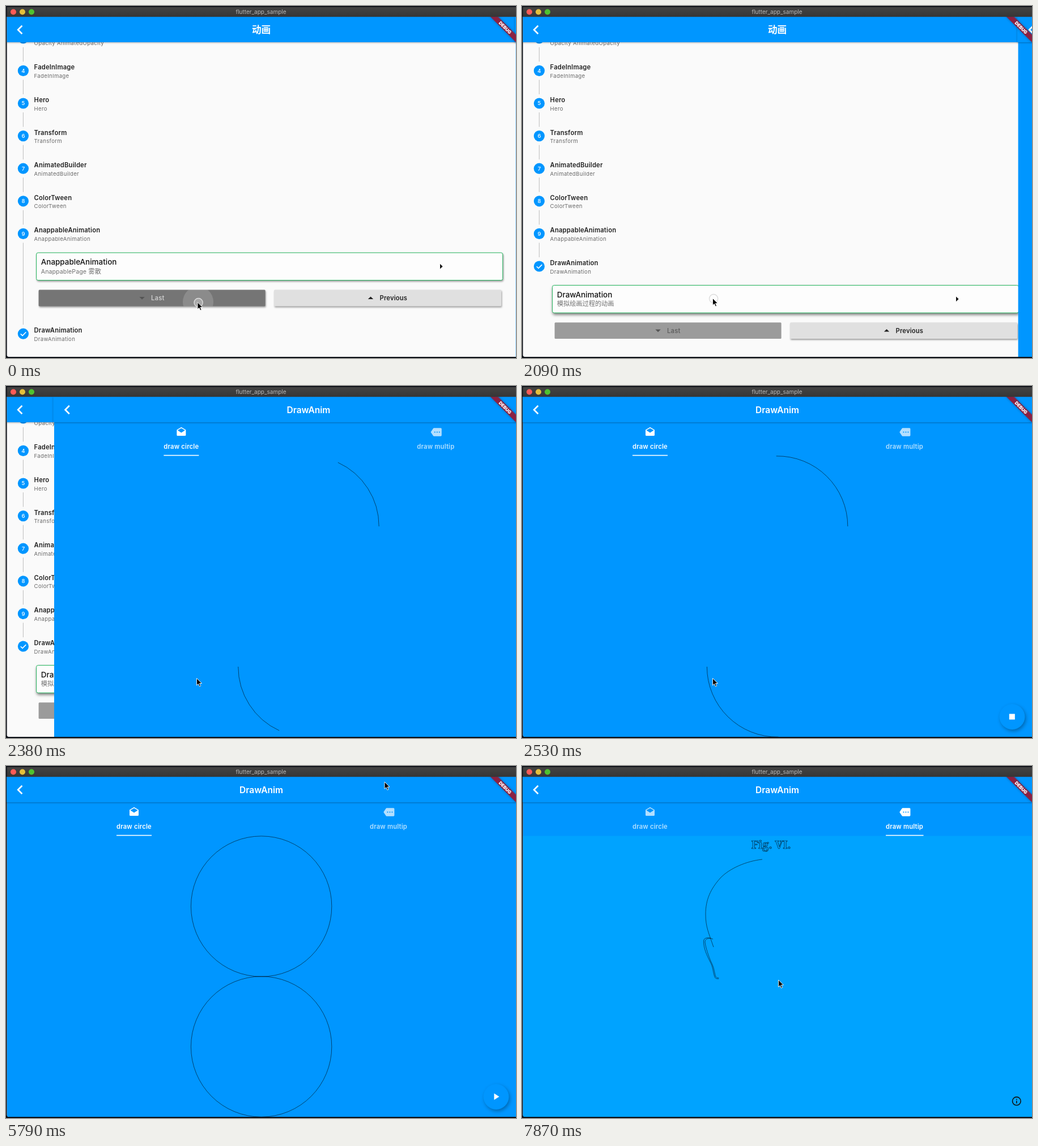
Write an HTML page that moves like this. It is 900 px wide and 622 px high and loops after 8 s.

```html
<!DOCTYPE html>
<html lang="zh">
<head>
<meta charset="utf-8">
<title>flutter_app_sample</title>
<style>
  html, body { margin: 0; width: 100%; height: 100%; overflow: hidden; background: #0a0e14; }
  svg { display: block; width: 100vw; height: 100vh; font-family: Inter, "Noto Sans CJK SC", "Noto Sans CJK", sans-serif; }
  .raised { filter: drop-shadow(1px 2px 1.5px rgba(0,0,0,.38)); }
  .high { filter: drop-shadow(1.5px 3px 2.5px rgba(0,0,0,.5)); }
  .bar { filter: drop-shadow(0 1.5px 1.5px rgba(0,0,0,.3)); }
  .fab { filter: drop-shadow(2px 3px 3px rgba(0,0,0,.3)); }
  .ink { fill: none; stroke: #000; stroke-width: .7; stroke-opacity: .8; }
</style>
</head>
<body>
<svg id="stage" viewBox="0 0 900 622" preserveAspectRatio="none"></svg>
<script>
const BLUE = '#0096ff', LOOP = 8000, PAGE_W = 898, ROW = 57.6, OPEN = 119.2;
const STEPS = ['FadeInImage', 'Hero', 'Transform', 'AnimatedBuilder', 'ColorTween', 'AnappableAnimation'];

// Screen updates come in bursts: [first, last, count]
const BURSTS = [[150, 450, 3], [750, 900, 2], [1940, 2970, 8], [3120, 4160, 8],
  [4460, 4600, 2], [5200, 6240, 8], [6390, 6830, 4], [7130, 7870, 6]];
const TICKS = [0, ...BURSTS.flatMap(([a, b, n]) =>
  Array.from({ length: n }, (_, i) => Math.floor((a + (b - a) * i / (n - 1)) / 10) * 10))];

const CURSOR = [[0, 338, 523.5], [150, 338, 523.5], [300, 325, 528], [450, 297, 536], [750, 318, 526],
  [900, 336.5, 516.5], [3420, 336.5, 516.5], [3860, 399.5, 438], [4160, 615, 203], [4460, 650, 150],
  [4600, 676, 98], [5200, 676, 90], [5640, 672, 20], [5790, 668, 28], [6240, 624, 353],
  [6540, 500, 368], [6830, 481, 370], [7280, 481, 372], [7870, 452.5, 378]];
const PRESSES = [[0, 300], [1940, 2200], [6240, 6600]];
const SWIPE = [[6240, 0], [6390, .07], [6540, .35], [6690, .9], [6830, 1]];
const FOLD = [[0, 0], [150, .2], [300, .8], [450, 1]];

const text = (x, y, s, size, o = '') => `<text x="${x}" y="${y}" font-size="${size}" ${o}>${s}</text>`;
const rect = (x, y, w, h, fill, o = '') => `<rect x="${x}" y="${y}" width="${w}" height="${h}" fill="${fill}" ${o}/>`;
const dot = (x, y, r, fill, o = '') => `<circle cx="${x}" cy="${y}" r="${r}" fill="${fill}" ${o}/>`;
const rail = (y1, y2, id = '') => `<line ${id} x1="30.4" x2="30.4" y1="${y1}" y2="${y2}" stroke="#bdbdbd"/>`;
const label = (x, y, s, o = '') => text(x, y, s, 11.2, `font-weight="600" letter-spacing=".2" ${o}`);
const back = '<path d="M28.4 34.8L21.2 42l7.2 7.2" fill="none" stroke="#fff" stroke-width="2.7"/>';
const appBar = title => `<g class="bar">${rect(0, 19, 900, 45, BLUE)}</g>${back}${title}`;

const heading = (y, s) => label(49.6, y - 2, s, 'fill="#212121"') +
  text(49.6, y + 12.6, s, 9.6, 'letter-spacing=".32" fill="#6a6a6a"');
const step = (y, n, s) => dot(30.4, y, 9.6, BLUE) +
  text(30.4, y + 3.4, n, 9.6, 'text-anchor="middle" font-weight="500" fill="#fff"') + heading(y, s);

// Card and buttons, relative to the centre of the step's circle
function content({ title, sub, card, last, ink, arrow, lift = '', extra = '' }) {
  return `<g class="${card}">${rect(53.6, 33.6, 823, 48.6, '#fdfdfd', 'rx="3" stroke="#22b35c"')}</g>
    ${text(61.8, 54.6, title, 13.4, 'font-weight="500" letter-spacing=".03" fill="#111"')}${sub}
    <path d="M766 53.4l4.6 4.4-4.6 4.4z" fill="#111"/>
    <g class="${lift}">${rect(57.6, 99.2, 400, 28.8, last, 'rx="1.5"')}</g>${extra}
    <path d="M235.4 111.6h9.4l-4.7 4.7z" fill="${arrow}"/>
    ${label(256, 117.7, 'Last', `fill="${ink}"`)}
    <g class="raised">${rect(473, 99.2, 401, 28.8, '#e0e0e0', 'rx="1.5"')}</g>
    <path d="M638.8 115.6h9.4l-4.7-4.6z" fill="#222"/>
    ${label(659.5, 117.7, 'Previous', 'fill="#222"')}`;
}

const listPage = () => {
  const subInk = 'fill="#707070"';
  const oldContent = content({
    title: 'AnappableAnimation', card: 'raised', lift: 'raised',
    sub: text(61.8, 70.2, 'AnappablePage', 10.6, subInk + ' letter-spacing=".08"') + text(145.5, 70.2, '雾散', 11.2, subInk),
    last: '#757575', ink: '#cbcbcb', arrow: '#555',
    extra: '<g clip-path="url(#btnClip)">' + dot(339, 120.5, 27, '#fff', 'fill-opacity=".16"') + '</g>',
  });
  const newContent = content({
    title: 'DrawAnimation', card: 'high',
    sub: text(61.8, 70.2, '模拟绘画过程的动画', 11.2, subInk),
    last: '#9b9b9b', ink: '#626262', arrow: '#555',
  });
  return rect(0, 19, 900, 603, '#fafafa') +
    dot(30.4, 56.8, 9.6, BLUE) + heading(56.8, 'Opacity AnimatedOpacity') +
    STEPS.map((s, i) => {
      const y = 114.4 + i * ROW;
      return rail(y - 41.6, y - 16) + step(y, i + 4, s);
    }).join('') + rail(418.4, 444, 'id="longRail"') +
    `<g transform="translate(0 402.4)"><g id="old" clip-path="url(#oldClip)">${oldContent}</g></g>
    <g id="drawStep">${dot(30.4, 0, 9.6, BLUE)}
      <path d="M25.8 .2l3.3 3.2 6.2-6.3" fill="none" stroke="#fff" stroke-width="1.6"/>
      ${heading(0, 'DrawAnimation')}
      <g id="fresh" clip-path="url(#freshClip)">${newContent}</g>
    </g>` +
    appBar(text(450.5, 47.8, '动画', 16.6, 'text-anchor="middle" font-weight="700" fill="#fff"'));
};

const MAIL = 'M22 8c0-.72-.37-1.35-.94-1.7L12 1 2.95 6.3C2.38 6.65 2 7.28 2 8v10c0 1.1.9 2 2 2h16c1.1 0 2-.9 2-2zM12 13L3.74 7.84 12 3l8.26 4.84z';
const TAG = 'M22 3H7c-.69 0-1.23.35-1.59.88L0 12l5.41 8.11c.36.53.9.89 1.59.89h15c1.1 0 2-.9 2-2V5c0-1.1-.9-2-2-2z';
const HEAD = 'M424 165C396 168 366 181 350 198C333 217 324 236 324 262C324 285 330 296 338 320';
const NOSE = ['M337 306C329 302 321 303 320.6 309C320 322 327 336 332 346C337 355 337 363 339.5 371C341 376.5 344 376 347.4 376',
  'M333 304.6C326 304 322.6 307 323 312C324.5 322 329 335 333.6 346C339 356 339.4 364 341.4 371C342.4 374.4 345 374.4 347.4 374.4'];
const stroke = (d, cls) => `<path class="ink ${cls}" pathLength="1" d="${d}"/>`;

const drawPage = () => rect(1.6, 19, PAGE_W + 1, 603, BLUE) +
  `<g id="tabs">
    <g>
      <path id="arcs" class="ink"/>
      <g class="fab">${dot(865, 584.5, 22.4, BLUE)}</g>
      ${rect(859.8, 579.4, 10, 10, '#fff', 'id="stop"')}
      <path id="play" d="M861.4 578.6v11.4l9-5.7z" fill="#fff"/>
    </g>
    <g transform="translate(${PAGE_W} 0)">
      ${rect(1.6, 123.6, PAGE_W + 1, 499, '#00a3ff')}
      ${text(404.8, 146, 'Fig. VI.', 20, 'id="fig" class="ink" font-weight="700" font-family="Noto Serif, serif"')}
      ${stroke(HEAD, 'head')}${NOSE.map(d => stroke(d, 'nose')).join('')}
      ${dot(872.8, 592.2, 7.3, 'none', 'stroke="#111" stroke-width="1.6"')}
      ${rect(872, 591.4, 1.6, 4.8, '#111')}${rect(872, 588.2, 1.6, 1.6, '#111')}
    </g>
  </g>
  <g id="tabA" fill="#fff"><path transform="translate(216.4 72) scale(.8)" d="${MAIL}"/>
    ${label(195, 111, 'draw circle')}</g>
  <g id="tabB" fill="#fff"><path transform="translate(666.2 71.9) scale(.8)" d="${TAG}"/>
    ${[673.4, 677.4, 681.4].map(x => dot(x, 81.5, 1.1, BLUE)).join('')}
    ${label(642, 111, 'draw multip')}</g>
  ${rect(195, 121.8, 62, 1.6, '#fff', 'id="mark"')}` +
  appBar(text(450.5, 47.6, 'DrawAnim', 15.5, 'text-anchor="middle" font-weight="600" fill="#fff"'));

const clip = (id, shape) => `<clipPath id="${id}">${shape}</clipPath>`;
document.getElementById('stage').innerHTML = `
  <defs>
    <linearGradient id="chrome" x2="0" y2="1"><stop stop-color="#444"/><stop offset="1" stop-color="#363636"/></linearGradient>
    ${clip('win', '<path d="M1.6 1.6H900V620H5q-3.4 0-3.4-3.4z"/>')}
    ${clip('oldClip', rect(0, 16, 900, 146, '#000', 'id="oldBox"'))}
    ${clip('freshClip', rect(0, 16, 900, 146, '#000', 'id="freshBox"'))}
    ${clip('btnClip', rect(57.6, 99.2, 400, 28.8, '#000'))}
  </defs>
  ${rect(0, 0, 900, 622, '#0a0e14')}
  <g clip-path="url(#win)">
    ${listPage()}
    <g id="drawPage">${drawPage()}</g>
    <g transform="translate(900 19) rotate(45)">
      ${rect(-33, 22.4, 66, 9.6, '#8b2142', 'style="filter:drop-shadow(0 0 2px rgba(0,0,0,.35))"')}
      ${text(0, 30.1, 'DEBUG', 8, 'text-anchor="middle" font-weight="900" fill="#fff"')}
    </g>
    ${rect(0, 1.6, 900, 17.6, 'url(#chrome)')}
    ${dot(13, 10.5, 5, '#fc5b57')}${dot(29, 10.5, 5, '#e5bf3c')}${dot(45, 10.5, 5, '#4fc22f')}
    ${text(450, 14, 'flutter_app_sample', 10, 'text-anchor="middle" fill="#b9b9b9"')}
  </g>
  <g id="cursor">
    ${dot(1.6, .6, 7.6, '#fff', 'id="press" fill-opacity=".25" stroke="#ddd" stroke-width="1.4"')}
    <path d="M0 0v12.4l2.9-2.6 2 4.6 2.1-.9-2-4.5h4z" fill="#000" stroke="#fff" stroke-width=".9"/>
  </g>`;

const $ = id => document.getElementById(id);
const set = (id, attrs) => { for (const k in attrs) $(id).setAttribute(k, attrs[k]); };
const move = (id, x, y) => set(id, { transform: `translate(${x} ${y})` });
const ramp = (t, a, b) => Math.min(1, Math.max(0, (t - a) / (b - a)));
const smooth = u => u * u * (3 - 2 * u);

function track(keys, t) {
  let i = 0;
  while (i < keys.length - 2 && t >= keys[i + 1][0]) i++;
  const [a, b] = [keys[i], keys[i + 1]], u = ramp(t, a[0], b[0]);
  return a.slice(1).map((v, k) => v + (b[k + 1] - v) * u);
}

// Counter-clockwise arc from angle a0, both in degrees
function arc(cy, a0, sweep) {
  const r = 124.2, cx = 450.6;
  const at = a => `${cx + r * Math.cos(a * Math.PI / 180)} ${cy - r * Math.sin(a * Math.PI / 180)}`;
  const go = a => `A${r} ${r} 0 0 0 ${at(a)}`;
  return `M${at(a0)}${go(a0 + sweep / 2)}${go(a0 + sweep)}`;
}

function dash(selector, u, len) {
  document.querySelectorAll(selector).forEach(e => {
    e.style.strokeDasharray = `${u * len} ${len * 2}`;
    e.style.visibility = u > 0 ? 'visible' : 'hidden';
  });
}

function update(ms) {
  const t = TICKS.filter(k => k <= ms).pop();

  const [fold] = track(FOLD, t);
  const y = 460 + OPEN * (1 - fold);
  move('drawStep', 0, y);
  set('longRail', { y2: y - 16 });
  set('old', { opacity: 1 - ramp(fold, 0, .6) });
  set('oldBox', { height: Math.max(0, 146 * (1 - fold)) });
  set('fresh', { opacity: ramp(fold, .4, 1) });
  set('freshBox', { height: 146 * fold });

  move('drawPage', PAGE_W * (1 - smooth(ramp(t, 2039, 2459))), 0);
  const sweep = Math.min(360, Math.max(0, (t - 2022) * .1825));
  set('arcs', { d: sweep ? arc(248, 0, sweep) + arc(496, 180, sweep) : '' });
  const done = sweep >= 360;
  set('stop', { opacity: done ? 0 : 1 });
  set('play', { opacity: done ? 1 : 0 });

  const [swipe] = track(SWIPE, t);
  move('tabs', -PAGE_W * swipe, 0);
  set('tabA', { opacity: 1 - .3 * swipe });
  set('tabB', { opacity: .7 + .3 * swipe });
  set('mark', { x: 195 + 447 * swipe, width: 62 + 4.5 * swipe });

  dash('#fig', ramp(t, 7000, 7500), 110);
  dash('.head', ramp(t, 7400, 7720), 1);
  dash('.nose', ramp(t, 7570, 7860), 1);

  move('cursor', ...track(CURSOR, t));
  set('press', { opacity: PRESSES.some(([a, b]) => t >= a && t < b) ? 1 : 0 });
}

const start = performance.now();
function loop() {
  update((performance.now() - start) % LOOP);
  requestAnimationFrame(loop);
}
loop();
</script>
</body>
</html>
```
